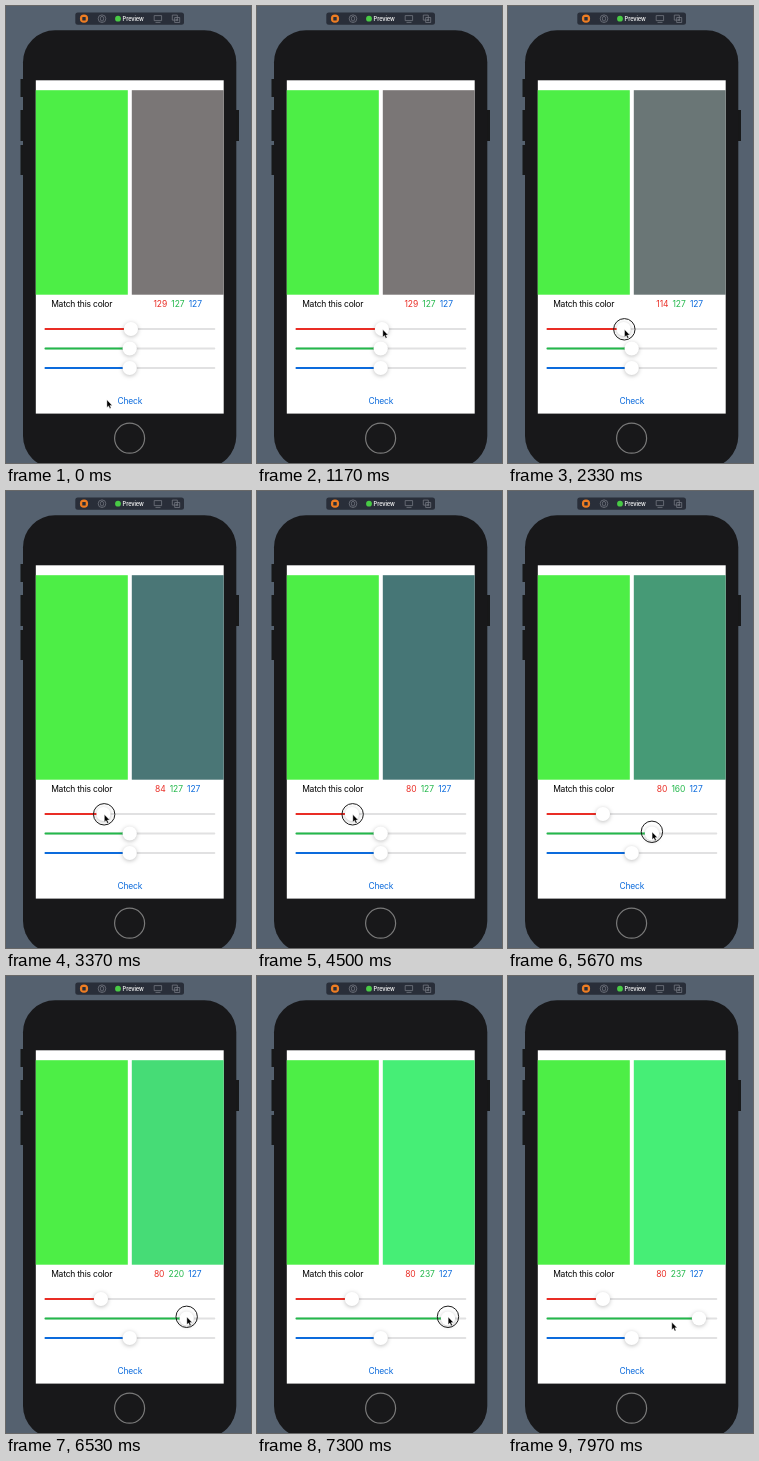
An HTML page that plays this animation: 245 px wide and 457 px high, repeating every 8 s.

```html
<!DOCTYPE html>
<html lang="en">
<head>
<meta charset="utf-8">
<title>Match this color</title>
<style>
  html, body { margin: 0; width: 100%; height: 100%; overflow: hidden; background: #55616f; }
  svg { display: block; width: 100vw; height: 100vh; }
  text { font: 8.5px Inter, Roboto, sans-serif; letter-spacing: -.025em; text-anchor: middle; }
  .red { fill: #e92d25; }
  .green { fill: #23b84b; }
  .blue { fill: #0c6bdc; }
  .rail { fill: #e1e1e2; }
  .thumb { fill: #fff; filter: drop-shadow(0 1.5px 2px rgba(0, 0, 0, .25)); }
  .icon { fill: none; stroke: #737780; stroke-width: .8; }
  #values { letter-spacing: -.01em; }
  #status { font-size: 5.7px; font-weight: 600; fill: #e8e9ea; }
</style>
</head>
<body>
<svg viewBox="0 0 245 457">
  <rect width="245" height="457" fill="#55616f"/>

  <g id="toolbar">
    <rect x="69.3" y="6.5" width="108.7" height="12.3" rx="2.5" fill="#292e39"/>
    <circle cx="78" cy="12.7" r="4.1" fill="#ee7d22"/>
    <rect x="76.3" y="11" width="3.4" height="3.4" rx=".5" fill="#292e39"/>
    <g class="icon">
      <circle cx="96" cy="12.7" r="3.8"/>
      <ellipse cx="96" cy="12.7" rx="1.6" ry="2.4"/>
      <path d="M148.2 9.6h7.4v5h-7.4zM149.5 16.4h5"/>
      <path d="M166.3 9.1h5v5h-5zM168.7 11.5h5v5h-5zM171.2 12.8v2.4M170 14h2.4"/>
    </g>
    <circle cx="112" cy="12.7" r="2.9" fill="#48ca45"/>
    <text id="status" x="127.1" y="14.8">Preview</text>
  </g>

  <g id="phone">
    <path d="M14.5 73h4v18h-4zM14.5 104h4v31h-4zM14.5 139h4v30h-4zM229 104h4v31h-4z" fill="#171819"/>
    <rect x="17" y="24.3" width="213.3" height="437.7" rx="32" fill="#18181a"/>
    <circle cx="123.6" cy="432.2" r="15" fill="none" stroke="#7a7a7a" stroke-width="1.2"/>
    <rect x="29.8" y="74.3" width="187.9" height="333.3" fill="#fff"/>
  </g>

  <rect x="29.8" y="84.2" width="92" height="204.5" fill="#4dee46"/>
  <rect id="guess" x="125.8" y="84.2" width="91.9" height="204.5"/>
  <text x="75.7" y="300.8">Match this color</text>
  <text id="values" x="171.7" y="300.8"><tspan class="red"></tspan><tspan class="green" dx="4.2"></tspan><tspan class="blue" dx="4.2"></tspan></text>
  <g id="sliders"></g>
  <text class="blue" x="123.8" y="397.6">Check</text>

  <g id="pointer">
    <circle id="press" r="10.7" fill="none" stroke="#1c1c1c"/>
    <path d="M.2.2V7.8L1.9 6.3L3.1 9L4.4 8.4L3.2 5.8H5.5Z" fill="#000" stroke="#fff" stroke-width=".4"/>
  </g>
</svg>

<script>
const LOOP = 8000;
const names = ['red', 'green', 'blue'];
const $ = id => document.getElementById(id);

const mix = (a, b, u) => a + (b - a) * u;
const thumbX = value => 46 + value / 255 * 156;
const railY = i => 323 + i * 19.5;

// Smooth progress from 0 to 1 between two times.
function ease(time, from, to) {
  const u = Math.min(1, Math.max(0, (time - from) / (to - from)));
  return u * u * (3 - 2 * u);
}

$('sliders').innerHTML = names.map((name, i) => {
  const y = railY(i);
  return `<rect class="rail" x="38.5" y="${y - .9}" width="170.8" height="1.8" rx=".9"/>
    <rect class="${name} fill" x="38.5" y="${y - .9}" height="1.8" rx=".9"/>
    <circle class="thumb" cy="${y}" r="7.1"/>`;
}).join('');

const fills = document.querySelectorAll('.fill');
const thumbs = document.querySelectorAll('.thumb');
const labels = document.querySelectorAll('tspan');

// The pointer visits the red thumb, then the green one, then rests.
function pointerAt(time, red, green) {
  const toRed = ease(time, 100, 850);
  const toGreen = ease(time, 4540, 4850);
  const toRest = ease(time, 7560, 7930);
  const along = (start, atRed, atGreen, rest) =>
    mix(mix(mix(start, atRed, toRed), atGreen, toGreen), rest, toRest);
  return [
    along(100.7, thumbX(red) + .7, thumbX(green), 163.6),
    along(393.6, railY(0) + .3, railY(1) - 1.7, 346)
  ];
}

function draw(time) {
  const red = mix(129, 80, ease(time, 1480, 3780));
  const green = mix(127, 237, ease(time, 4867, 7078));
  [red, green, 127].forEach((value, i) => {
    const x = thumbX(value);
    fills[i].setAttribute('width', x - 38.5);
    thumbs[i].setAttribute('cx', x);
    labels[i].textContent = Math.round(value);
  });
  $('guess').setAttribute('fill',
    `rgb(${mix(70, 122, (red - 80) / 49)}, ${mix(118, 238, (green - 127) / 110)}, 118)`);
  $('pointer').setAttribute('transform', `translate(${pointerAt(time, red, green)})`);
  const pressed = time >= 1350 && time < 4540 || time >= 4850 && time < 7560;
  $('press').setAttribute('visibility', pressed ? 'visible' : 'hidden');
}

const start = performance.now();
function tick() {
  draw((performance.now() - start) % LOOP);
  requestAnimationFrame(tick);
}
tick();
</script>
</body>
</html>
```
